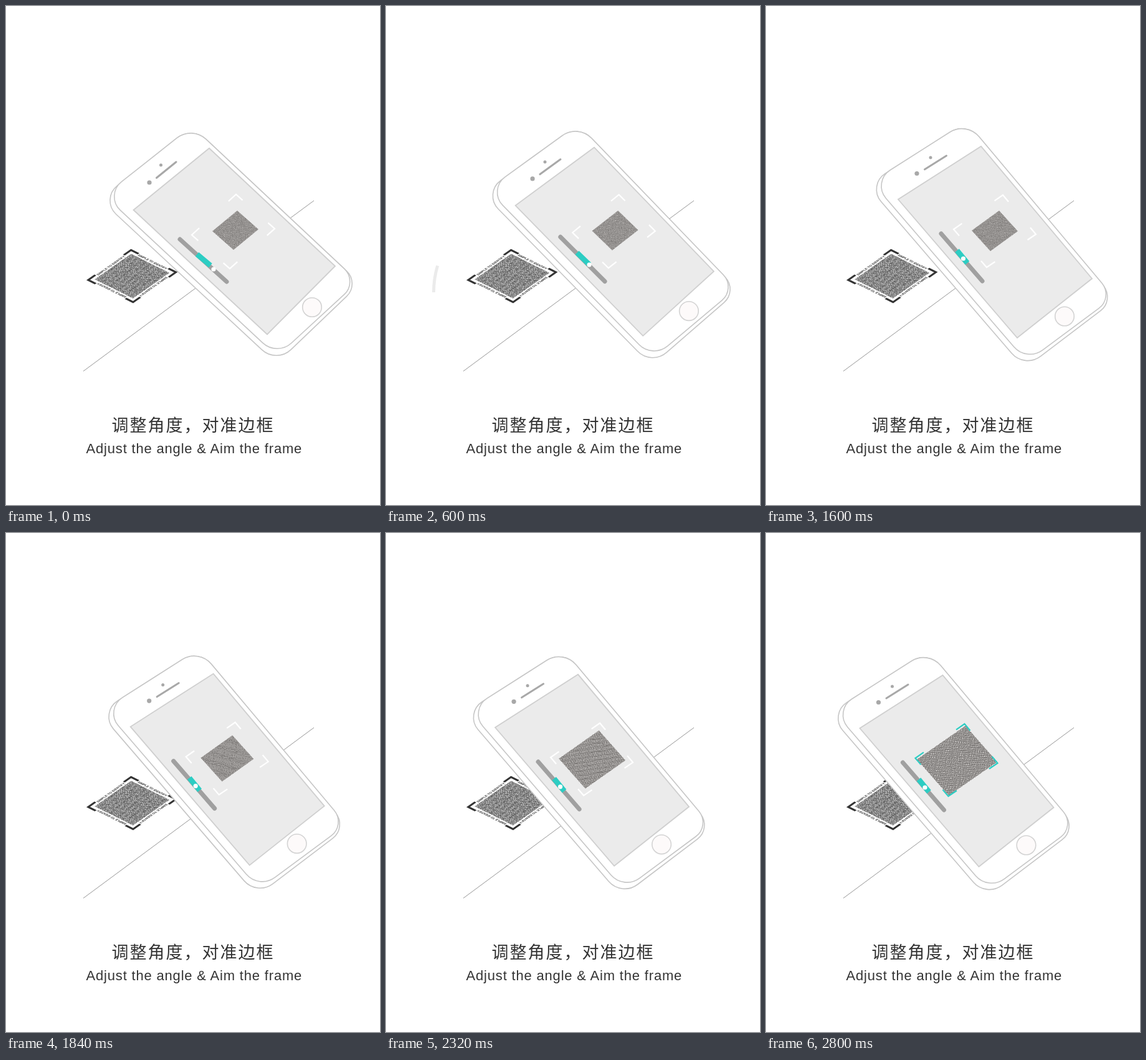
An HTML page with a canvas that plays this animation: 600 by 800 pixels, repeating every 3.47 s.

```html
<!DOCTYPE html>
<html lang="zh-CN">
<head>
<meta charset="utf-8">
<title>Adjust the angle</title>
<style>
  html, body { margin: 0; width: 100%; height: 100%; overflow: hidden; background: #fff; }
  canvas, svg { position: absolute; left: 0; top: 0; width: 600px; height: 800px; }
  text { fill: #333; }
  .zh { font: 300 27px "Noto Sans CJK SC", "Noto Sans CJK", sans-serif; letter-spacing: 2px; }
  .en { font: 22px "Liberation Sans", Arial, sans-serif; letter-spacing: 0.82px; }
</style>
</head>
<body>
<canvas id="stage" width="600" height="800"></canvas>
<svg viewBox="0 0 600 800">
  <text class="zh" x="169.5" y="682">调整角度，对准边框</text>
  <text class="en" x="128.5" y="717">Adjust the angle &amp; Aim the frame</text>
</svg>
<script>
const ctx = document.getElementById('stage').getContext('2d');
ctx.imageSmoothingQuality = 'high';
const LOOP = 3470, STEP = 30;
const TEAL = '#2ccdc3';
const RADII = [36, 28, 34, 30];

// Corners run top, right, bottom, left.
const tilted = {
  body: [[298.4, 192.5], [568, 445], [434, 573], [151, 310]],
  face: [[298.4, 192.5], [564.9, 442], [434.9, 561.5], [157.7, 303.6]],
  screen: [[326, 228], [528, 417], [419, 526.5], [204.5, 327]],
  aim: [[369, 302], [431, 357], [359, 421], [298, 367]],
  code: [[371, 328], [405, 358], [331, 361]],
  speaker: [[241.5, 275.5], [273, 250]],
  dots: [[230, 283], [248.5, 255]],
  home: [[491, 483]],
  track: [[279, 374], [354, 442]],
  zone: [[306.5, 398], [328, 416]],
  knob: [[333, 422]]
};
const aligned = {
  body: [[321.5, 185.4], [560, 471], [415, 581], [162, 287.3]],
  face: [[321.5, 185.4], [558, 467], [418.4, 570.4], [169.7, 281.9]],
  screen: [[345, 225], [523, 437], [403, 532], [212, 310]],
  aim: [[380, 303], [433, 366], [354, 419], [301, 358]],
  code: [[374, 328], [404, 361], [330, 360]],
  speaker: [[254.5, 262], [289.5, 240]],
  dots: [[242, 268.5], [264, 243]],
  home: [[479, 497.5]],
  track: [[281, 365], [347, 441]],
  zone: [[306.5, 392], [323, 412]],
  knob: [[316.5, 405]]
};
const SLIDE = [-61.5, 3];
const codeFilled = [[320, 309], [371, 367], [242, 363]];

const mix = (a, b, p) => a.map((v, i) => v + (b[i] - v) * p);
const mixAll = (a, b, p) => a.map((pt, i) => mix(pt, b[i], p));
const clamp = (v, lo, hi) => Math.min(hi, Math.max(lo, v));
const stepsSince = (t, from) => Math.floor((t - from) / STEP);

// Random diagonal dashes, carrying no information.
function dashTexture(dark, light) {
  const count = 40, cell = 6, c = document.createElement('canvas');
  c.width = c.height = count * cell;
  const g = c.getContext('2d');
  g.fillStyle = light;
  g.fillRect(0, 0, c.width, c.height);
  g.strokeStyle = dark;
  g.lineWidth = cell * 0.42;
  let seed = 7;
  for (let i = 0; i < count * count; i++) {
    seed = (seed * 1664525 + 1013904223) % 4294967296;
    const x = i % count * cell, y = Math.floor(i / count) * cell;
    const flip = seed < 2147483648 ? cell : 0;
    g.beginPath();
    g.moveTo(x + flip, y);
    g.lineTo(x + cell - flip, y + cell);
    g.stroke();
  }
  return c;
}
const printTexture = dashTexture('#333', '#fff');
const screenTexture = dashTexture('#615e5c', '#dcd9d7');

function stroke(points, color, width, cap = 'butt') {
  ctx.beginPath();
  points.forEach(p => ctx.lineTo(...p));
  ctx.strokeStyle = color;
  ctx.lineWidth = width;
  ctx.lineCap = cap;
  ctx.stroke();
}

function paint(fill, line, width) {
  ctx.fillStyle = fill;
  ctx.fill();
  if (!line) return;
  ctx.strokeStyle = line;
  ctx.lineWidth = width;
  ctx.stroke();
}

function disc([x, y], r, fill, line) {
  ctx.beginPath();
  ctx.arc(x, y, r, 0, 7);
  paint(fill, line, 1.6);
}

function quad(pts, radii, fill, line, width) {
  ctx.beginPath();
  ctx.moveTo(...mix(pts[3], pts[0], 0.5));
  pts.forEach((p, i) => ctx.arcTo(...p, ...pts[(i + 1) % 4], radii ? radii[i] : 0));
  ctx.closePath();
  paint(fill, line, width);
}

function drawPrint() {
  ctx.save();
  ctx.transform(0.75, 0.37, -0.715, 0.5, 200.5, 389.5);
  ctx.drawImage(printTexture, 9, 9, 82, 82);
  ctx.font = 'bold 6px "Liberation Sans", Arial, sans-serif';
  ctx.textAlign = 'center';
  for (let i = 0; i < 4; i++) {
    stroke([[2, 18], [2, 2], [18, 2]], '#333', 4);
    ctx.fillStyle = '#333';
    ctx.fillText('SIMPLE TO IDENTIFY', 50, 6.5);
    ctx.translate(50, 50);
    ctx.rotate(Math.PI / 2);
    ctx.translate(-50, -50);
  }
  ctx.restore();
}

function drawSweep(p) {
  ctx.beginPath();
  ctx.arc(226.5, 459, 150, Math.PI, Math.PI + 0.64 * p);
  ctx.strokeStyle = '#ebebeb';
  ctx.lineWidth = 5;
  ctx.lineCap = 'butt';
  ctx.stroke();
}

function drawScreenCode([top, right, left]) {
  ctx.save();
  ctx.transform(right[0] - top[0], right[1] - top[1], left[0] - top[0], left[1] - top[1], ...top);
  ctx.drawImage(screenTexture, 0, 0, 1, 1);
  ctx.restore();
}

function drawPhone(turn, slide) {
  const part = {};
  for (const key in tilted) {
    part[key] = mixAll(tilted[key], aligned[key], turn)
      .map(([x, y]) => [x + SLIDE[0] * slide, y + SLIDE[1] * slide]);
  }
  quad(part.body, RADII, '#fff', '#c6c6c6', 1.6);
  quad(part.face, RADII, '#fff', '#c6c6c6', 1.6);
  quad(part.screen, null, '#ebebeb', '#cfcfcf', 1.8);
  stroke(part.speaker, '#a8a8a8', 3, 'round');
  disc(part.dots[0], 3.6, '#a8a8a8');
  disc(part.dots[1], 2.5, '#a8a8a8');
  disc(part.home[0], 15.3, '#fdfafa', '#d3d3d3');

  drawScreenCode(slide > 0
    ? mixAll(aligned.code, codeFilled, slide)
    : mixAll(tilted.code, aligned.code, turn));
  part.aim.forEach((corner, i, all) => {
    const before = mix(corner, all[(i + 3) % 4], 0.17);
    const after = mix(corner, all[(i + 1) % 4], 0.17);
    stroke([before, corner, after], slide === 1 ? TEAL : '#fff', 2.2);
  });

  stroke(part.track, '#a0a0a0', 7, 'round');
  stroke(part.zone, TEAL, 8.5);
  disc(part.knob[0], 3.6, '#fff');
}

function draw(t) {
  const turn = clamp(stepsSince(t, 360) / 19, 0, 1);
  const slide = clamp(stepsSince(t, 1600) / 40, 0, 1);
  ctx.fillStyle = '#fff';
  ctx.fillRect(0, 0, 600, 800);
  stroke([[124, 585.5], [494, 312]], '#8c8c8c', 0.9);
  drawPrint();
  if (t >= 360 && t < 1600) drawSweep(clamp((stepsSince(t, 360) + 1) / 20, 0, 1));
  drawPhone(turn, slide);
}

const start = performance.now();
function tick() {
  draw((performance.now() - start) % LOOP);
  requestAnimationFrame(tick);
}
tick();
</script>
</body>
</html>
```
